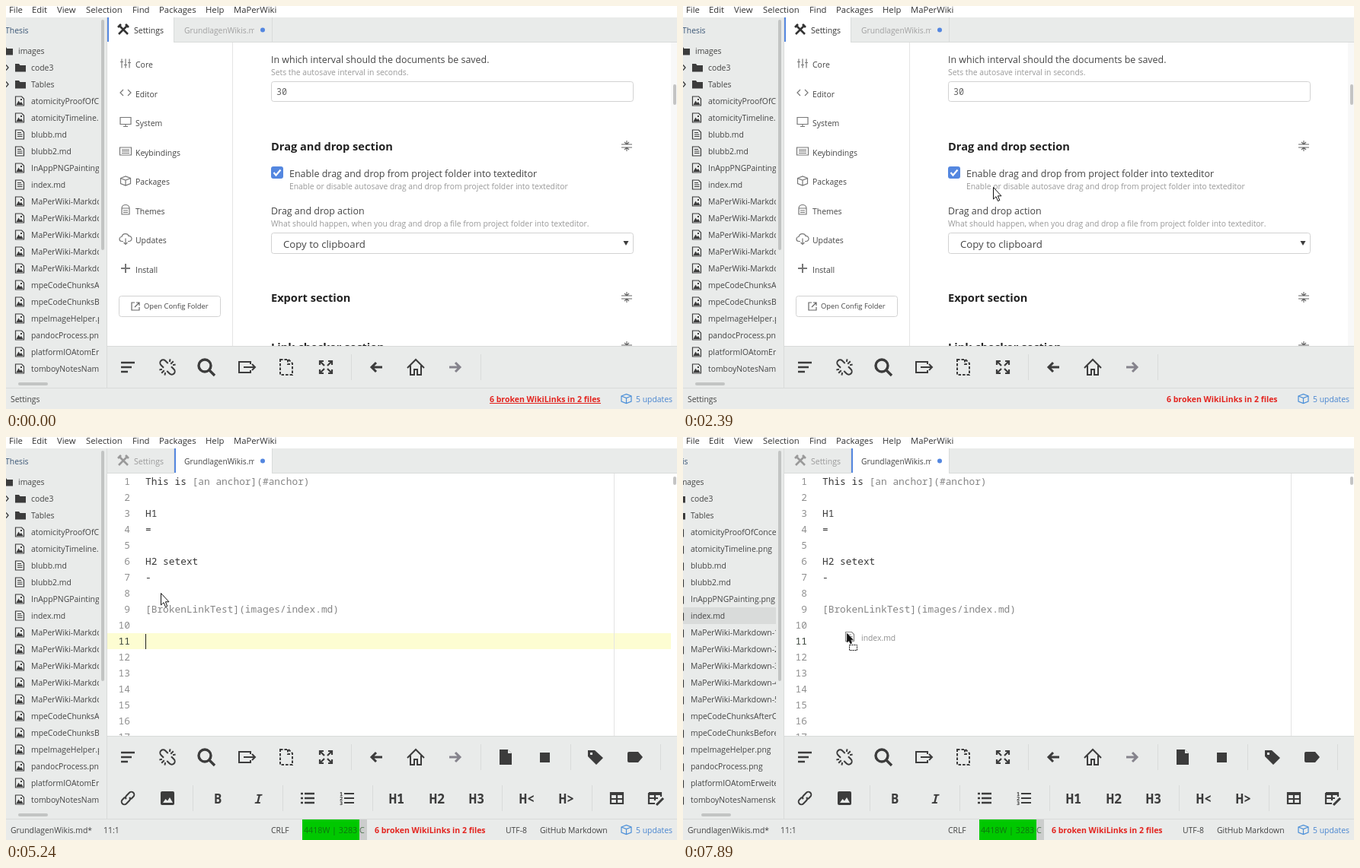
An HTML page that plays this animation: 881x530 px, repeating every 8000 ms.

```html
<!DOCTYPE html>
<html lang="en">
<head>
<meta charset="utf-8">
<title>Drag and drop settings</title>
<style>
html, body { margin: 0; width: 100%; height: 100%; overflow: hidden; background: #fff; }
svg { display: block; width: 881px; height: 530px; }
text { font: 10.4px "Open Sans", sans-serif; fill: #444; white-space: pre; }
.mono, .mono text { font-family: "Noto Sans Mono", monospace; }
.line { fill: none; stroke: currentColor; stroke-width: 2; }
.solid { fill: currentColor; }
g { color: #3c3c3c; }
</style>
</head>
<body>
<svg id="stage" viewBox="0 0 881 530"></svg>
<script>
const BLUE = '#5487e0', PANEL = '#e9ebea', EDGE = '#d9dbda', RED = '#e3241f';

const text = (x, y, s, size = 10.4, fill = '#444', more = '') =>
  `<text x="${x}" y="${y}" style="font-size:${size}px;fill:${fill};${more}">${s.replace(/</g, '&lt;')}</text>`;
const rect = (x, y, w, h, fill, more = '') =>
  `<rect x="${x}" y="${y}" width="${w}" height="${h}" fill="${fill}" ${more}/>`;
const line = (x, y, d, width = 2, more = '', turn = 0) =>
  `<path class="line" transform="translate(${x} ${y}) rotate(${turn})" d="${d}" style="stroke-width:${width}" ${more}/>`;
const solid = (x, y, d, more = '') =>
  `<path class="solid" transform="translate(${x} ${y})" d="${d}" ${more}/>`;
const group = (id, body, more = '') => `<g id="${id}" ${more}>${body}</g>`;
const box = (x, y, w, h, more = 'fill="#fff"') =>
  `<rect x="${x + .5}" y="${y + .5}" width="${w}" height="${h}" rx="3" stroke="#d2d2d2" ${more}/>`;
const bold = 'font-weight:700';

const PAGE = 'M-5.5-6H2.5L5.5-3V6H-5.5Z';
const SHEET = 'M-8-10H3L8-5V10H-8Z';
const CHAIN = 'M-2-3.7H-6.5a3.7 3.7 0 0 0 0 7.4H-1a3.7 3.7 0 0 0 3.5-3M2 3.7H6.5a3.7 3.7 0 0 0 0-7.4H1a3.7 3.7 0 0 0-3.5 3';
const BROKEN_CHAIN = 'M-3-4H-8a4 4 0 0 0 0 8H-3M3-4H8a4 4 0 0 1 0 8H3M0-11V-6M0 6V11M-5-10L-3-7M5-10L3-7M-5 10L-3 7M5 10L3 7';
const CUBE = 'M-6.5-3L0-5.5 6.5-3V4L0 6.5-6.5 4ZM-6.5-3L0-.5 6.5-3M0-.5V6.5';
const TOOLS = 'M-6 6L6-6M-6-6L6 6M-7-3L-3-7M3-7L7-3';

const fileIcon = (x, y, image) => line(x, y, PAGE, 1.2) + (image
  ? solid(x, y, 'M-4.5 5L-1.5-.5 .5 2.5 2 1 4.5 5ZM1-3h2v2H1Z')
  : line(x, y, 'M-3-2.5H2M-3 0H3.5M-3 2.5H3.5', 1));

function tree() {
  const names = ['code3', 'Tables', 'atomicityProofOfConcept.png', 'atomicityTimeline.png', 'blubb.md',
    'blubb2.md', 'InAppPNGPainting.png', 'index.md', ...[1, 2, 3, 4, 5].map(n => `MaPerWiki-Markdown-${n}.png`),
    'mpeCodeChunksAfterCode.png', 'mpeCodeChunksBefore.png', 'mpeImageHelper.png', 'pandocProcess.png',
    'platformIOAtomErweiterung.png', 'tomboyNotesNamenskonvention.png'];
  const folder = (x, y) => solid(x, y, 'M-7-5H-2L-.5-3H7V5.5H-7Z');
  const rows = names.map((name, i) => {
    const y = 81 + 22 * i;
    const icon = i < 2 ? folder(19, y) + line(0, y, 'M0-3.5L3 0 0 3.5', 1.4)
      : fileIcon(18, y, name.endsWith('png'));
    return icon + text(33, y + 4, name, 10.4);
  });
  return text(-1, 36, 'Thesis', 10.4, '#3a5575') + folder(2, 59) + text(16, 63, 'images', 10.4) + rows.join('');
}

function settingsView() {
  const nav = [
    ['Core', 'M-5-6V6M0-6V6M5-6V6M-7-2H-3M-2 2H2M3-1H7'], ['Editor', 'M-3-4L-7 0-3 4M3-4L7 0 3 4'],
    ['System', 'M-7-6H7V3H-7ZM-3 6H3M0 3V6'], ['Keybindings', 'M-7.5-5H7.5V5H-7.5ZM-5-2H5M-5 0H5M-5 2.5H5'],
    ['Packages', CUBE], ['Themes', 'M-5-2H5V6H-5ZM-5-2C-5-8 5-8 5-2M-3 1H3M-3 3.5H3'],
    ['Updates', 'M-3 3H-5A3 3 0 0 1-5-3C-4-8 3-8 4-4A3.5 3.5 0 0 1 5 3H3M0-1V7M-2.5 4.5L0 7 2.5 4.5'],
    ['Install', 'M-6 0H6M0-6V6']];
  const fold = y => line(815, y, 'M-7-2H7M-7 2H7M0-7V-2M0 7V2M-3-5L0-2 3-5M-3 5L0 2 3 5', 1.1, 'color="#666"');
  const heading = (y, s) => text(348, y + 5, s, 14.6, '#222', bold) + fold(y - 1);
  const hint = (x, y, s) => text(x, y, s, 10.35, '#999');
  return rect(133, 48, 748, 400, '#fff') + rect(297, 48, 1, 400, '#e4e4e4') + rect(873, 48, 8, 400, '#f8f8f8')
    + rect(876, 103, 4, 27, '#c4c4c4', 'rx="2"')
    + nav.map(([s, d], i) => line(157, 75.5 + 38.5 * i, d, i == 7 ? 2 : 1.2, 'color="#777"')
      + text(170, 81 + 38.5 * i, s, 10.45)).join('')
    + box(148, 381, 133, 27) + line(170, 395, 'M-1-5H-5V5H5V1M1-5H5V-1M5-5L-1 1', 1.2, 'color="#666"')
    + text(181, 397.5, 'Open Config Folder', 9.4)
    + text(348, 75, 'In which interval should the documents be saved.', 12.45)
    + hint(348, 91, 'Sets the autosave interval in seconds.')
    + box(348, 99, 475, 26) + `<g class="mono">${text(355, 117, '30', 11.7, '#666')}</g>`
    + heading(185, 'Drag and drop section')
    + rect(348, 211, 16, 16, BLUE, 'rx="3"') + line(356, 219, 'M-4.5 0L-1.5 3.5 4.5-3.5', 2.2, 'color="#fff"')
    + text(372, 225, 'Enable drag and drop from project folder into texteditor', 12.5)
    + hint(372, 241, 'Enable or disable autosave drag and drop from project folder into texteditor')
    + text(348, 274, 'Drag and drop action', 12.45)
    + hint(348, 290, 'What should happen, when you drag and drop a file from project folder into texteditor.')
    + box(348, 298, 475, 27, 'id="select"') + text(364, 318, 'Copy to clipboard', 13.2)
    + solid(814, 312, 'M-3.5-3H3.5L0 3Z')
    + heading(384, 'Export section') + heading(449, 'Link checker section')
    + group('tip', rect(166, 297, 171, 30, BLUE, 'rx="3"') + `<path d="M337 308L342 313 337 318Z" fill="${BLUE}"/>`
      + text(178, 317, 'Default: Copy to clipboard', 12.1, '#fff'));
}

function editorView() {
  const lines = { 3: 'H1', 4: '=', 6: 'H2 setext', 7: '-' };
  let body = rect(133, 48, 748, 346, '#fff')
    + rect(133, 258, 740, 21, '#fdfdd2', 'id="active"') + rect(798, 48, 1, 346, '#e4e4e4')
    + rect(876, 52, 4, 11, '#c4c4c4', 'rx="2"');
  const code = (x, n, s, fill = '#383838', more = '') => text(x, 42 + 21 * n, s, 12.83, fill, more);
  for (let n = 1; n <= 17; n++) {
    body += code(163, n, '' + n, n == 11 ? '#3c463c' : '#8f8f8f', 'text-anchor:end');
    if (lines[n]) body += code(183, n, lines[n]);
  }
  return body + code(183, 1, 'This is ') + code(244.6, 1, '[an anchor](#anchor)', '#858585')
    + code(183, 9, '[BrokenLinkTest](images/index.md)', '#858585')
    + rect(183, 259, 1, 20, '#222', 'id="caret"');
}

const rule = (x, y) => rect(x, y - 17, 1, 34, EDGE);

const mainTools = () => line(160, 475, 'M-9-6H9M-9 0H5M-9 6H0', 2.6)
  + line(212, 475, BROKEN_CHAIN, 2, '', 45)
  + line(263, 475, 'M6-2A8 8 0 1 1-10-2A8 8 0 1 1 6-2M4 4L11 11', 3.4)
  + line(316, 475, 'M5-4V-7H-10V7H5V4M-4 0H11M7-4L11 0 7 4')
  + line(368, 475, SHEET + 'M2-10V-4H8', 2, 'stroke-dasharray="3.5 2"')
  + line(420, 475, 'M2-2L8-8M3-8H8V-3M-2-2L-8-8M-3-8H-8V-3M2 2L8 8M3 8H8V3M-2 2L-8 8M-3 8H-8V3', 2.2)
  + rule(453, 475) + line(486, 475, 'M8 0H-6M0-6L-6 0 0 6', 3)
  + line(538, 475, 'M-11 1L0-10 11 1M-7-2V10H-2V3H2V10H7V-2')
  + line(590, 475, 'M-8 0H6M0-6L6 0 0 6', 3, 'color="#85838c"') + rule(623, 475);

function editorTools() {
  const label = (x, s, more = '') => text(x, 481.5, s, 17, '#3c3c3c', 'text-anchor:middle;font-weight:600;' + more);
  const rows = 'M-4-6H9M-4 0H9M-4 6H9', grid = 'M-8-7H8V7H-8ZM-8 1H8M0-5V7M-8-5H8';
  return solid(656, 421, SHEET) + solid(656, 421, 'M3-10V-5H8', `style="color:${PANEL}"`)
    + rect(701, 415, 13, 13, '#3c3c3c') + rule(741, 421)
    + solid(774, 421, 'M-10-9H-1L10 1 1 10-10-1ZM-7-6V-3H-4V-6Z', 'fill-rule="evenodd"')
    + solid(826, 421, 'M-8-7H4L10 0 4 7H-8Q-10 7-10 5V-5Q-10-7-8-7Z') + rule(859, 421)
    + line(160, 475, CHAIN, 2, '', -45)
    + rect(203, 466, 18, 18, '#3c3c3c', 'rx="2"') + solid(212, 475, 'M-6 6L-2.5 1 0 3.5 3-1 7 6Z', `style="color:${PANEL}"`)
    + rule(245, 475) + rule(363, 475) + rule(481, 475) + rule(651, 475) + rule(769, 475)
    + label(278, 'B', bold) + label(330, 'I', 'font-style:italic;font-weight:700')
    + line(396, 475, rows + 'M-9-6H-6M-9 0H-6M-9 6H-6', 2.3) + line(448, 475, rows)
    + [1, 2, 3].map(n => text(438, 466 + 6 * n, '' + n, 7, '#3c3c3c', bold)).join('')
    + label(513, 'H1') + label(566, 'H2') + label(618, 'H3') + label(684, 'H<') + label(736, 'H>')
    + line(802, 475, grid, 2.2) + line(852, 475, 'M-8-7H8V-2M-8-7V7H0M-8 0H4M0-5V3M-8-5H8', 2.2)
    + line(859, 479, 'M-5 5L4-4', 3);
}

const statusText = (x, s) => text(x, 521, s);
const broken = x => text(x, 521, '6 broken WikiLinks in 2 files', 10.5, RED, bold);

document.getElementById('stage').innerHTML = `
<defs><clipPath id="treeClip"><rect y="16" width="122" height="476"/></clipPath>
<clipPath id="tabClip"><rect x="221" y="15" width="105" height="32"/></clipPath></defs>`
  + rect(0, 0, 881, 530, '#fff') + [['File', 4], ['Edit', 34], ['View', 67], ['Selection', 105], ['Find', 166],
    ['Packages', 201], ['Help', 262], ['MaPerWiki', 299]].map(([s, x]) => text(x, 9, s, 11.3, '#333')).join('')
  + rect(0, 15, 881, 33, PANEL) + rect(133, 47, 748, 1, EDGE)
  + group('settings', settingsView()) + group('editor', editorView(), 'class="mono"')
  + rect(132, 448, 749, 82, PANEL) + group('tallBar', rect(133, 393, 748, 110, PANEL) + rect(133, 393, 748, 1, EDGE)
    + editorTools(), 'class="mono"') + group('shortEdge', rect(133, 447, 748, 1, EDGE))
  + group('mainTools', mainTools())
  + rect(0, 15, 132, 515, PANEL) + rect(132, 15, 1, 488, EDGE) + rect(0, 224, 122, 22, '#d9dbda', 'id="row"')
  + `<g clip-path="url(#treeClip)">${group('tree', tree())}</g>`
  + rect(125, 18, 4, 303, '#c2c4c3', 'rx="2"') + rect(16, 495, 39, 4, '#c2c4c3', 'rx="2" id="thumb"')
  + rect(0, 502, 881, 1, EDGE)
  + rect(133, 15, 87, 33, '#fff', 'id="tabFill"') + rect(133, 15, 2, 32, BLUE, 'id="tabBar"')
  + rect(220, 15, 1, 32, EDGE) + rect(349, 15, 1, 32, EDGE)
  + group('tabA', line(154, 31, TOOLS, 2.6) + text(168, 36, 'Settings', 10.5, 'currentColor'))
  + group('tabB', `<g clip-path="url(#tabClip)" style="color:inherit">${text(234, 36, 'GrundlagenWikis.md', 10.3, 'currentColor')}</g>`)
  + `<circle id="dot" cx="337" cy="31.5" r="3" fill="${BLUE}"/>` + line(337, 31, 'M-3.5-3.5L3.5 3.5M-3.5 3.5L3.5-3.5', 2, `id="close" color="${BLUE}"`)
  + group('statusA', statusText(6, 'Settings') + broken(635)
    + rect(635, 522, 146, 1, RED, 'id="underline"'))
  + group('statusB', statusText(6, 'GrundlagenWikis.md*') + statusText(128, '11:1') + statusText(348, 'CRLF')
    + rect(389, 503, 75, 27, '#00c800') + rect(464, 503, 10, 27, '#cbcdcc')
    + text(391, 521, '4418W | 3283 C', 10.7, '#174d17', 'opacity:.7') + broken(484)
    + statusText(656, 'UTF-8') + statusText(701, 'GitHub Markdown'))
  + line(814.5, 516, CUBE, 1.2, 'color="#4a8fd8"') + text(827, 521, '5 updates', 10.4, '#4a86d0')
  + group('label', rect(47, 247, 61, 20, '#888', 'opacity=".6"') + rect(44.5, 244.5, 61, 20, '#fff', 'stroke="#777"')
    + text(50, 258, 'index.md', 11, '#555'))
  + '<circle id="press" cx="57" cy="242.5" r="28" fill="#f4ea30" opacity=".7"/>'
  + group('cursor', group('ghost', fileIcon(4, 4.5, false) + text(19, 10, 'index.md'), 'opacity=".6"')
    + '<path id="arrow" d="M.5.5V16L4 12.7 6.5 18.5 8.8 17.5 6.4 11.8H11Z" stroke="#111"/>'
    + rect(3.5, 15.5, 10, 7, '#fff', 'id="drop" stroke="#111" stroke-dasharray="2 1"'));

// Pointer path: time, x, y
const PATH = [[625, 690, 500], [750, 600, 445], [1000, 470, 335], [1375, 438, 318], [1500, 456, 318], [1625, 440, 318],
  [1750, 409, 318], [1875, 407, 306], [2000, 407, 292], [2250, 407, 253], [2375, 407, 238], [2750, 452, 225],
  [2875, 457, 228], [3125, 455, 230], [3750, 255, 35], [4000, 262, 41], [4375, 262, 41], [4625, 278, 182],
  [4750, 278, 182], [5000, 250, 208], [5250, 203, 205], [5750, 48, 197], [5875, 45, 195], [6250, 45, 195],
  [6750, 46, 231], [7000, 48, 233], [7250, 48, 233], [7625, 214, 257], [7875, 215, 258]];

function pointer(t) {
  const i = PATH.findIndex(p => p[0] > t);
  if (i < 1) return PATH[i ? PATH.length - 1 : 0].slice(1);
  const [t0, x0, y0] = PATH[i - 1], [t1, x1, y1] = PATH[i], k = (t - t0) / (t1 - t0);
  return [x0 + (x1 - x0) * k, y0 + (y1 - y0) * k];
}

const el = id => document.getElementById(id);
const set = (id, name, value) => el(id).setAttribute(name, value);
const show = (id, on) => { el(id).style.display = on ? '' : 'none'; };

function draw(now) {
  const t = Math.floor((now % 8000 + 10) / 125) * 125 % 8000;
  const editing = t >= 4000, pressed = t >= 7125, dragging = t >= 7375, closeHover = editing && t < 4500;

  for (const id of ['settings', 'statusA', 'shortEdge']) show(id, !editing);
  for (const id of ['editor', 'statusB', 'tallBar']) show(id, editing);
  set('mainTools', 'transform', `translate(0 ${editing ? -54 : 0})`);
  set('tabFill', 'x', editing ? 221 : 133);
  set('tabFill', 'width', editing ? 128 : 87);
  set('tabBar', 'x', editing ? 221 : 133);
  el('tabA').style.color = editing ? '#999' : '#333';
  el('tabB').style.color = editing ? '#444' : '#a0a0a0';
  show('dot', !closeHover);
  show('close', closeHover);

  show('underline', t < 750);
  set('select', 'fill', t >= 1125 && t < 2125 ? '#f1f1f1' : '#fff');
  const fadeIn = (t - 1000) / 250, fadeOut = (2000 - t) / 250;
  set('tip', 'opacity', Math.max(0, Math.min(1, fadeIn, fadeOut)));

  show('active', !pressed);
  show('caret', !pressed && Math.floor((t - 4070) / 400) % 2 == 0);
  show('row', pressed);
  show('press', pressed && !dragging);
  show('label', pressed && !dragging);
  set('tree', 'transform', `translate(${dragging ? -23 : 0} 0)`);
  set('thumb', 'x', dragging ? 24 : 16);

  show('cursor', t >= 625);
  show('ghost', dragging);
  show('drop', dragging);
  set('arrow', 'fill', dragging ? '#111' : '#fff');
  set('arrow', 'transform', `scale(${dragging ? .75 : 1})`);
  set('cursor', 'transform', `translate(${pointer(t).map(Math.round)})`);
  requestAnimationFrame(draw);
}
requestAnimationFrame(draw);
</script>
</body>
</html>
```
